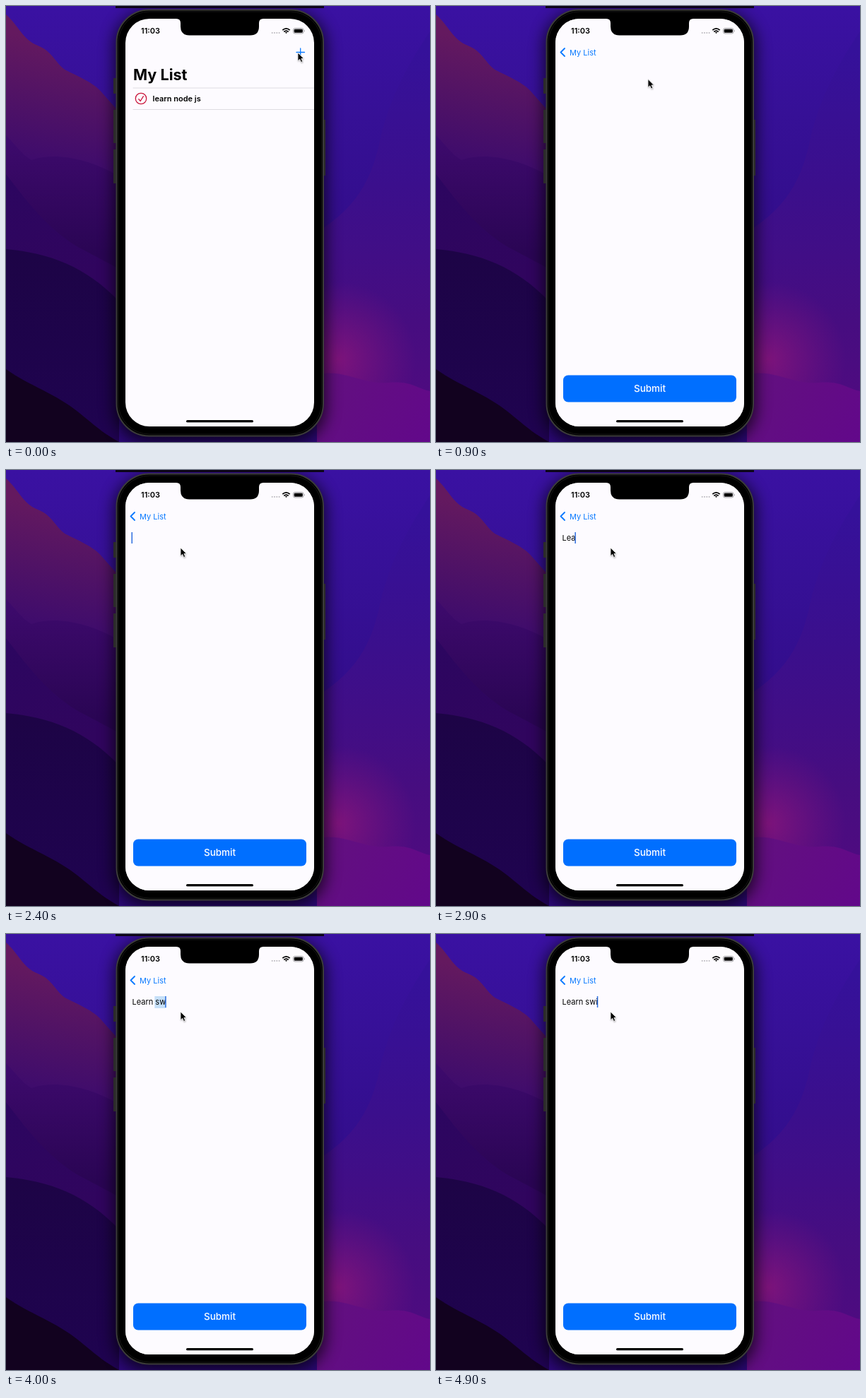
These frames come from a looping animation (600 by 617 pixels, 5000 ms). An HTML page:

```html
<!DOCTYPE html>
<html lang="en">
<head>
<meta charset="utf-8">
<title>My List</title>
<style>
  html, body { margin: 0; width: 100%; height: 100%; overflow: hidden; background: #2a0a70; }
  svg { display: block; width: 100vw; height: 100vh; }
  text { font: 400 11px Inter, "Liberation Sans", sans-serif; fill: #000; white-space: pre; }
  .semi { font-weight: 600; }
  .title { font-size: 21.6px; font-weight: 700; }
  .submit { font-size: 13.5px; font-weight: 500; fill: #fff; }
  .blue { fill: #0a7aff; }
  .line { fill: none; stroke-linecap: round; stroke-linejoin: round; }
</style>
</head>
<body>
<svg viewBox="0 0 600 617">
  <defs>
    <linearGradient id="sky" x2="0" y2="1">
      <stop stop-color="#3a11a2"/><stop offset=".25" stop-color="#361096"/><stop offset="1" stop-color="#2c0878"/>
    </linearGradient>
    <linearGradient id="red" gradientUnits="userSpaceOnUse" x1="70" y1="50" x2="40" y2="215">
      <stop stop-color="#64195f"/><stop offset=".5" stop-color="#511365"/><stop offset="1" stop-color="#3f0c6c"/>
    </linearGradient>
    <linearGradient id="hillA" gradientUnits="userSpaceOnUse" x1="0" y1="190" x2="0" y2="350">
      <stop stop-color="#3d0a6c"/><stop offset="1" stop-color="#2a0554"/>
    </linearGradient>
    <linearGradient id="hillB" gradientUnits="userSpaceOnUse" x1="0" y1="240" x2="60" y2="400">
      <stop stop-color="#2c0660"/><stop offset="1" stop-color="#30055e"/>
    </linearGradient>
    <linearGradient id="hillC" gradientUnits="userSpaceOnUse" x1="0" y1="345" x2="0" y2="617">
      <stop stop-color="#1d0446"/><stop offset="1" stop-color="#1f0350"/>
    </linearGradient>
    <linearGradient id="slope" gradientUnits="userSpaceOnUse" x1="0" y1="60" x2="0" y2="617">
      <stop stop-color="#35119a"/><stop offset=".35" stop-color="#3b0f8c"/>
      <stop offset=".7" stop-color="#470d80"/><stop offset="1" stop-color="#520a80"/>
    </linearGradient>
    <radialGradient id="glow" gradientUnits="userSpaceOnUse" cx="470" cy="500" r="110">
      <stop stop-color="#86157a" stop-opacity=".85"/><stop offset="1" stop-color="#7a1480" stop-opacity="0"/>
    </radialGradient>
    <linearGradient id="floor" gradientUnits="userSpaceOnUse" x1="450" y1="520" x2="600" y2="617">
      <stop stop-color="#62107f"/><stop offset="1" stop-color="#62088a"/>
    </linearGradient>
    <filter id="blur" x="-30%" y="-20%" width="160%" height="140%"><feGaussianBlur stdDeviation="11"/></filter>
    <filter id="soft" x="-50%" y="-50%" width="200%" height="200%"><feGaussianBlur stdDeviation="1"/></filter>
    <clipPath id="screen"><rect x="169" y="18" width="267" height="577" rx="34"/></clipPath>
  </defs>

  <!-- wallpaper -->
  <rect width="600" height="617" fill="url(#sky)"/>
  <path fill="url(#red)" d="M0 12C18 28 24 48 45 56S72 84 85 91 125 108 137 124L160 150V300H0Z"/>
  <path fill="url(#hillA)" d="M0 183C14 197 22 210 36 218 66 207 115 214 160 241V420H0Z"/>
  <path fill="url(#hillB)" d="M0 238C28 274 55 312 100 340L160 372V460H0Z"/>
  <path fill="url(#hillC)" d="M0 344C62 350 112 368 160 418V617H0Z"/>
  <path fill="#12021f" d="M0 514C34 538 70 548 104 576S138 604 160 617H0Z"/>
  <path fill="url(#slope)" d="M600 36C562 92 540 140 528 195S492 288 440 320V617H600Z"/>
  <rect x="360" y="390" width="240" height="227" fill="url(#glow)"/>
  <path fill="url(#floor)" d="M440 522C474 512 505 536 540 533S580 541 600 545V617H440Z"/>

  <!-- phone -->
  <rect x="153" y="8" width="300" height="610" rx="48" opacity=".7" filter="url(#blur)"/>
  <path fill="#0c0518" d="M155 0H450V3H155Z"/>
  <path fill="#2b2b2a" d="M152 102h5v22h-5zM152 147h5v47h-5zM152 203h5v48h-5zM448 161h4v79h-4z"/>
  <rect x="156.5" y="5.5" width="292.5" height="603" rx="46" fill="#000" stroke="#3b3b39" stroke-width="2"/>
  <rect x="159" y="8" width="287.500" height="598" rx="44" fill="none" stroke="#171716"/>

  <g clip-path="url(#screen)">
    <rect x="169" y="18" width="267" height="577" fill="#fdfbff"/>
    <g id="list">
      <text class="title" x="180" y="105">My List</text>
      <path class="line" stroke="#dedce2" d="M180 116H436M180 146.500H436"/>
      <g class="line" stroke="#c9163c" stroke-width="1.300">
        <circle cx="191" cy="131" r="7.700"/>
        <path d="M187.800 131.800L190.200 134.500 194.300 127.800"/>
      </g>
      <text class="semi" x="207.500" y="135">learn node js</text>
    </g>
    <g id="detail">
      <rect x="169" y="18" width="267" height="577" fill="#fdfbff"/>
      <rect id="mark" y="88" height="17" fill="#c5dff8"/>
      <text id="entry" x="178.500" y="100"></text>
      <rect id="caret" y="88" width="1.500" height="16" fill="#2f6fe0"/>
      <rect x="180" y="522.500" width="245" height="38" rx="7" fill="#006fff"/>
      <text class="submit" x="302.500" y="546.300" text-anchor="middle">Submit</text>
    </g>
    <path id="plus" class="line" stroke="#0a7aff" stroke-width="1.300" d="M411 65.500H422.500M416.700 60V71.500"/>
    <g id="back">
      <path class="line" stroke="#0a7aff" stroke-width="1.800" d="M182 60L176.500 65.500 182 71"/>
      <text class="blue" x="189" y="69.500">My List</text>
    </g>
    <text class="semi" x="191" y="39">11:03</text>
    <path class="line" stroke="#bbb9be" stroke-width="2" d="M376.700 38h0M380 38h0M383.300 38h0M386.600 38h0"/>
    <g class="line" stroke="#000" stroke-width="1.700" style="stroke-linecap:butt">
      <path d="M391.300 34.200Q396.500 29.400 401.700 34.200M393.300 36.500Q396.500 33.700 399.700 36.500"/>
      <path d="M395 37.400L396.500 39 398 37.400Q396.500 36.300 395 37.400Z" fill="#000" stroke="none"/>
    </g>
    <rect x="406.500" y="31.500" width="14.500" height="7.500" rx="2.300" fill="none" stroke="#8d8c90" stroke-width=".8"/>
    <rect x="407.700" y="32.700" width="12.100" height="5.100" rx="1.300"/>
    <path fill="#8d8c90" d="M422 33.800q1.500 1.400 0 2.900z"/>
    <rect x="255" y="586" width="95" height="3.300" rx="1.650"/>
  </g>
  <path d="M241 17H364V18Q358 18 358 24V29Q358 41.500 345.500 41.500H259.500Q247 41.500 247 29V24Q247 18 241 18Z"/>

  <g id="cursor">
    <path d="M0 1V13L3 10.500 5 15 7.500 14 5.500 9.500H9Z" opacity=".35" filter="url(#soft)"/>
    <path d="M0 0V11.700L2.700 9.300 4.600 13.500 6.700 12.600 4.900 8.500H8.400Z" stroke="#fff" stroke-width=".8"/>
  </g>
</svg>
<script>
const LOOP = 5000, STEP = 100;
const $ = id => document.getElementById(id);
const clamp = x => Math.max(0, Math.min(1, x));
const smooth = x => x * x * (3 - 2 * x);
const shift = (id, x, y = 0) => $(id).setAttribute("transform", `translate(${x} ${y})`);

// [time, x, y] of the pointer tip
const path = [[400, 413, 66], [900, 300, 103.5], [1200, 280, 107], [1800, 280, 107], [2200, 247, 110]];
const phrase = "Learn swi";
const keys = [2700, 2800, 2900, 3000, 3200, 3500, 3700, 3900, 4200];
const FOCUS = 1500;

function pointer(t) {
  let [t0, x0, y0] = path[0];
  for (const [t1, x1, y1] of path.slice(1)) {
    const k = smooth(clamp((t - t0) / (t1 - t0)));
    if (t < t1) return [x0 + (x1 - x0) * k, y0 + (y1 - y0) * k];
    [t0, x0, y0] = [t1, x1, y1];
  }
  return [x0, y0];
}

function draw(t) {
  const push = 1 - (1 - clamp((t - 250) / 500)) ** 3;
  shift("list", -80 * push);
  shift("detail", 267 * (1 - push));
  shift("back", 60 * (1 - push));
  $("back").setAttribute("opacity", push);
  $("plus").setAttribute("opacity", clamp(1 - push * 2));
  shift("cursor", ...pointer(t));

  const typed = keys.filter(k => k <= t).length;
  const entry = $("entry");
  entry.textContent = phrase.slice(0, typed);
  const end = 178.5 + (typed ? entry.getComputedTextLength() : 0);
  const idle = (t - (keys[typed - 1] || FOCUS)) % 1000;
  $("caret").setAttribute("x", end - 1);
  $("caret").setAttribute("opacity", t >= FOCUS && (idle < 350 || idle > 650) ? 1 : 0);

  const marked = typed === 8;
  const start = marked ? 177.5 + entry.getSubStringLength(0, 6) : end;
  $("mark").setAttribute("x", start);
  $("mark").setAttribute("width", marked ? end - start + 0.5 : 0);
}

const began = performance.now();
function tick() {
  const t = (performance.now() - began) % LOOP;
  draw(Math.floor(t / STEP) * STEP);
  requestAnimationFrame(tick);
}
draw(0);
requestAnimationFrame(tick);
</script>
</body>
</html>
```
